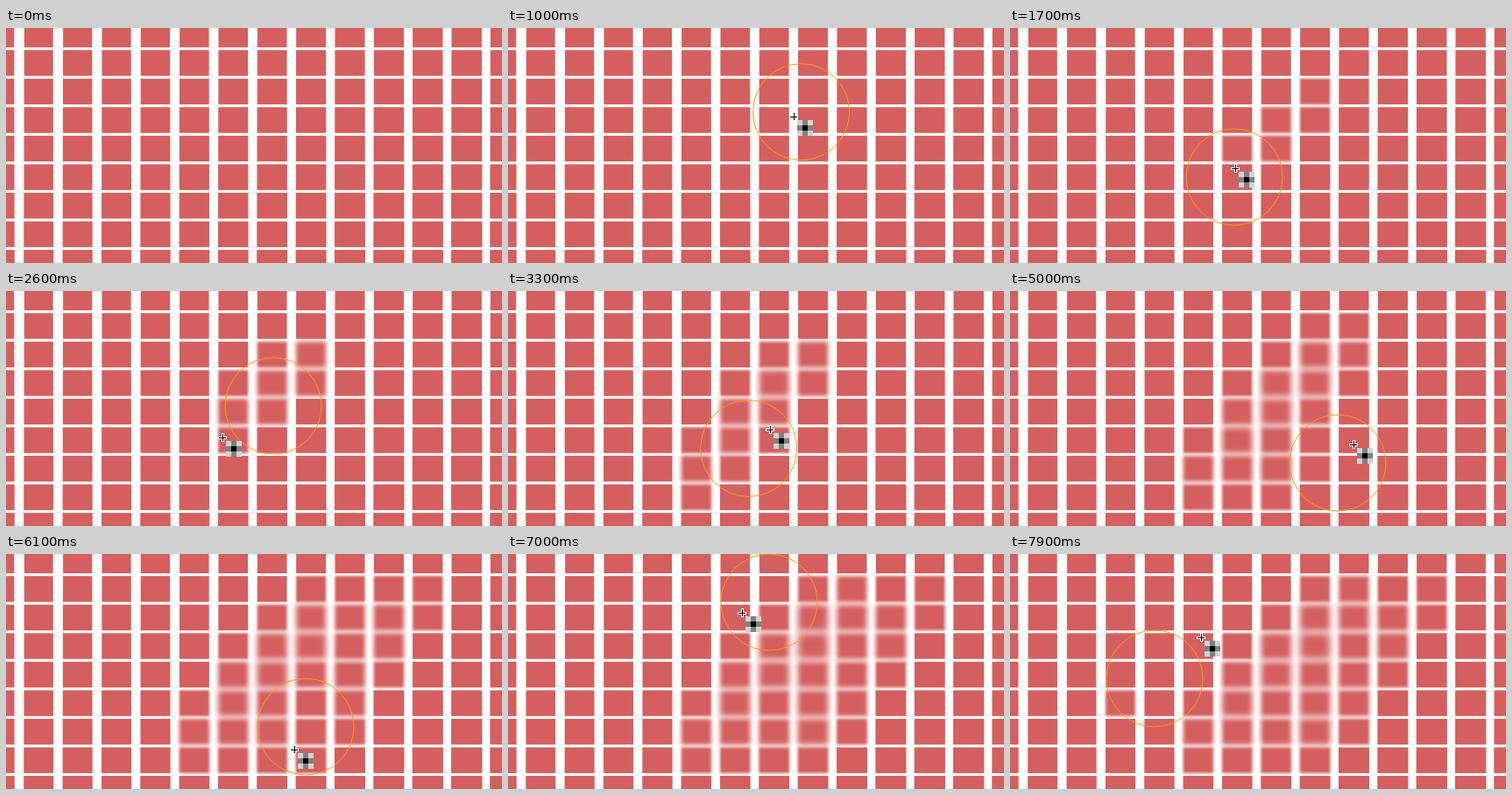
Animation, 566 px wide and 268 px high, one loop 8 s. Source, as an HTML page with a canvas:

```html
<!DOCTYPE html>
<html lang="en">
<head>
<meta charset="utf-8">
<title>Blur brush</title>
<style>
  html, body { margin: 0; width: 100%; height: 100%; overflow: hidden; background: #fff; }
  canvas { display: block; }
</style>
</head>
<body>
<canvas id="stage" width="566" height="268"></canvas>
<script>
const LOOP = 8000, START = 700, STEP = 100;
const LAG = 100;            // the ring trails the pointer, the blur trails the ring
const RING = 55, REACH = 50;
const SLICE = 20;           // ms per sample of the stroke
const LIFT = 6750, PRESS = 7450;

// Pointer: time, x, y at its turns and a few places between
const keys = [
  [600, 348, 88], [1400, 283, 131], [1600, 256, 170], [1700, 257, 160], [2050, 352, 65],
  [2500, 305, 131], [2600, 247, 167], [2900, 207, 230], [3300, 299, 158], [3900, 385, 48],
  [4000, 379, 79], [4600, 259, 226], [4900, 374, 196], [5000, 392, 175], [5450, 471, 45],
  [6000, 342, 197], [6100, 329, 223], [6600, 390, 42], [6900, 298, 55], [7570, 125, 178],
  [7800, 165, 142], [7900, 218, 95]
];

const ctx = document.getElementById('stage').getContext('2d');

const cells = [];
for (let r = 0; r < 9; r++) {
  for (let c = -1; c < 13; c++) {
    const w = 32.9 + 0.14 * (c + r);
    const x = 20.8 + 44.33 * c - 0.07 * r;
    const y = 25.2 + 32.55 * (r - 1);
    cells.push({ x, y, w, h: 29.4, cx: x + w / 2, cy: y + 14.7 });
  }
}

const slope = (i, a) => (keys[i + 1][a] - keys[i][a]) / (keys[i + 1][0] - keys[i][0]);

// Tangent that is flat at turns, so the curve never overshoots a key
function tangent(i, a) {
  if (i === 0 || i === keys.length - 1) return 0;
  const p = slope(i - 1, a), q = slope(i, a);
  return p * q <= 0 ? 0 : 2 * p * q / (p + q);
}

function pointer(t) {
  t = Math.min(Math.max(t, keys[0][0]), keys[keys.length - 1][0]);
  let i = 0;
  while (i < keys.length - 2 && t > keys[i + 1][0]) i++;
  const span = keys[i + 1][0] - keys[i][0];
  const k = (t - keys[i][0]) / span;
  return [1, 2].map(a => {
    const e = k * k * (3 - 2 * k);
    return keys[i][a] * (1 - e) + keys[i + 1][a] * e +
      span * k * (1 - k) * ((1 - k) * tangent(i, a) - k * tangent(i + 1, a));
  });
}

// How much brush each cell has received up to pointer time t
function exposure(end) {
  const sum = cells.map(() => 0);
  let [px, py] = pointer(keys[0][0]);
  for (let t = keys[0][0] + SLICE; t <= end; t += SLICE) {
    const [x, y] = pointer(t);
    const len = Math.hypot(x - px, y - py);
    [px, py] = [x, y];
    if (t > LIFT && t < PRESS) continue;
    cells.forEach((cell, i) => {
      const d = Math.hypot(cell.cx - x, cell.cy - y) / REACH;
      if (d < 1) sum[i] += (0.5 + 0.5 * Math.cos(Math.PI * d)) * len / REACH;
    });
  }
  return sum;
}

function drawCells(end) {
  const sum = exposure(end);
  ctx.fillStyle = '#fff';
  ctx.fillRect(0, 0, 566, 268);
  ctx.fillStyle = '#d45f5f';
  cells.forEach(({ x, y, w, h }, i) => {
    const sigma = 1.8 * sum[i] ** 0.6;
    ctx.filter = sigma > 0.2 ? `blur(${sigma.toFixed(2)}px)` : 'none';
    ctx.fillRect(x, y, w, h);
  });
  ctx.filter = 'none';
}

function drawRing(x, y) {
  ctx.strokeStyle = '#ff9a14';
  ctx.lineWidth = 1;
  ctx.beginPath();
  ctx.arc(x, y, RING, 0, 2 * Math.PI);
  ctx.stroke();
}

function drawPointer(x, y) {
  ctx.fillStyle = '#fff';
  ctx.fillRect(x - 5, y - 1, 10, 3);
  ctx.fillRect(x - 1, y - 5, 3, 10);
  ctx.fillStyle = '#000';
  ctx.fillRect(x - 4, y, 8, 1);
  ctx.fillRect(x, y - 4, 1, 8);

  const shades = ['#d2d2d2', '#808080', '#000'];
  for (let r = 0; r < 3; r++) {
    for (let c = 0; c < 3; c++) {
      ctx.fillStyle = shades[(r === 1) + (c === 1)];
      ctx.fillRect(x + 4 + 6 * c, y + 4 + 6 * r, 6, 6);
    }
  }
}

function show(t) {
  drawCells(t - 2 * LAG);
  if (t < START) return;
  drawRing(...pointer(t - LAG));
  drawPointer(...pointer(t).map(Math.round));
}

const begin = performance.now();
let shown = -1;

function tick() {
  const now = (performance.now() - begin) % LOOP;
  const t = now < START ? 0 : Math.floor(now / STEP) * STEP;
  if (t !== shown) show(shown = t);
  requestAnimationFrame(tick);
}
tick();
</script>
</body>
</html>
```
